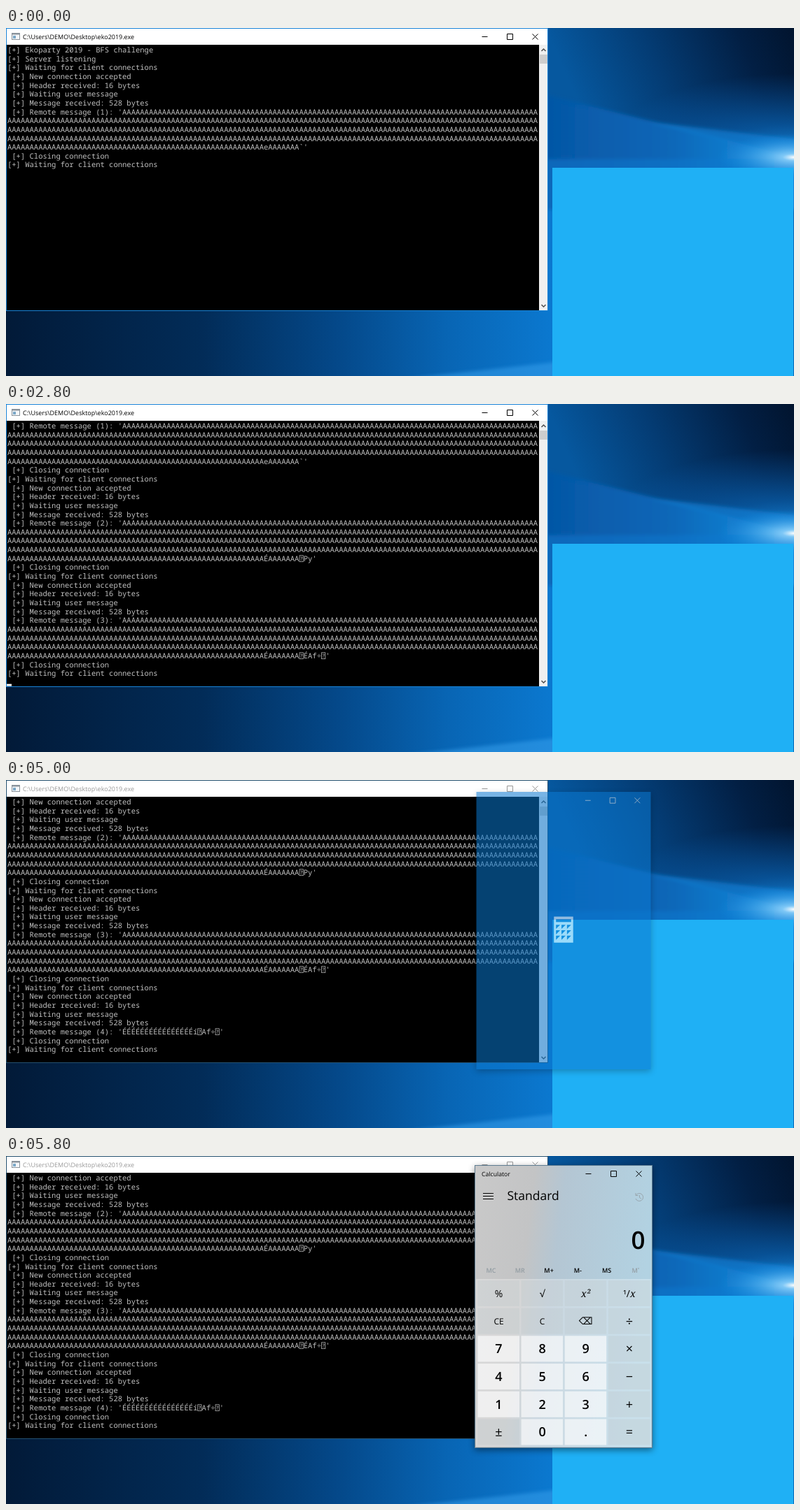
An HTML page for the animation above (6.7 s loop, 1125x498 px).

```html
<!DOCTYPE html>
<html lang="en">
<head>
<meta charset="utf-8">
<title>Console and calculator</title>
<style>
html, body { margin: 0; width: 100%; height: 100%; overflow: hidden; background: #011029; }
svg { display: block; }
text { font-family: "Open Sans", "Noto Sans", "DejaVu Sans", sans-serif; text-rendering: geometricPrecision; white-space: pre; }
#rows text { font: 10.53px "Noto Sans Mono", "DejaVu Sans Mono", monospace; fill: #c0c0c0; }
.line { fill: none; stroke: currentColor; }
.mid text { text-anchor: middle; }
#calc { transform-origin: 796px 215.5px; }
#frame { filter: drop-shadow(0 3px 5px rgba(0, 0, 0, .45)); }
</style>
</head>
<body>
<svg width="1125" height="498" viewBox="0 0 1125 498">
  <defs>
    <linearGradient id="floor">
      <stop offset="0" stop-color="#021a38"/><stop offset=".25" stop-color="#022c58"/>
      <stop offset=".42" stop-color="#044889"/><stop offset=".56" stop-color="#0865b4"/>
      <stop offset=".69" stop-color="#0b78cf"/><stop offset="1" stop-color="#0a68b8"/>
    </linearGradient>
    <linearGradient id="sky" x2="1" y2="-.3">
      <stop offset="0" stop-color="#06589f"/><stop offset=".35" stop-color="#043c74"/>
      <stop offset=".7" stop-color="#021f44"/><stop offset="1" stop-color="#011026"/>
    </linearGradient>
    <linearGradient id="ray">
      <stop offset="0" stop-color="#0656a4"/><stop offset=".5" stop-color="#0867b8"/>
      <stop offset="1" stop-color="#1e92e4"/>
    </linearGradient>
    <radialGradient id="haze">
      <stop offset="0" stop-color="#1a90e6"/><stop offset=".4" stop-color="#0a64b4" stop-opacity=".7"/>
      <stop offset="1" stop-color="#0a5cac" stop-opacity="0"/>
    </radialGradient>
    <radialGradient id="glow">
      <stop offset="0" stop-color="#fff"/><stop offset=".15" stop-color="#9fdcff" stop-opacity=".75"/>
      <stop offset="1" stop-color="#0a90e8" stop-opacity="0"/>
    </radialGradient>
    <linearGradient id="acrylic" y2=".2">
      <stop offset="0" stop-color="#c9c9c9"/><stop offset=".33" stop-color="#c3c4c5"/>
      <stop offset=".5" stop-color="#b4c6d3"/><stop offset="1" stop-color="#b2d2e2"/>
    </linearGradient>
    <filter id="soft" x="-20%" y="-20%" width="140%" height="140%"><feGaussianBlur stdDeviation="2.500"/></filter>
  </defs>

  <rect width="1125" height="498" fill="url(#floor)"/>
  <path d="M560 503L785 478V503Z" fill="#3aa2ee" opacity=".5" filter="url(#soft)"/>
  <rect x="770" width="355" height="240" fill="url(#sky)"/>
  <ellipse cx="1125" cy="185" rx="280" ry="120" fill="url(#haze)"/>
  <g filter="url(#soft)">
    <path d="M765 94L1135 187V260H765Z" fill="url(#ray)"/>
    <path d="M765 188L1135 187V260H765Z" fill="#0a78d0" opacity=".5"/>
    <path d="M915 134L1135 187L1135 160Z" fill="#1484da" opacity=".6"/>
  </g>
  <ellipse cx="1125" cy="185" rx="110" ry="34" fill="url(#glow)"/>
  <rect x="780" y="200" width="344" height="344" fill="#1fb0f5"/>

  <g id="console">
    <rect width="774" height="404.5" fill="#000"/>
    <rect width="774" height="24" fill="#fff"/>
    <rect x="761" y="24" width="13" height="380" fill="#f0f0f0"/>
    <rect x="762" y="38" width="11" height="13" fill="#cdcdcd"/>
    <path class="line" d="M764.5 33l3-3 3 3M764.5 396l3 3 3-3" color="#505050" stroke-width="1.5"/>
    <rect id="edge" class="line" x=".5" y=".5" width="773" height="404"/>
    <path d="M8 7h12v10h-12z" fill="#8a939b"/>
    <path d="M9 9.500h10v6.500h-10z" fill="#f4f6f8"/>
    <path d="M10 11h4v4h-4z" fill="#7aa7c7"/>
    <g id="caption">
      <text x="24" y="15.500" font-size="9" fill="currentColor">C:\Users\DEMO\Desktop\eko2019.exe</text>
      <path class="line ctl" data-x="683.5" data-y="12.5"/>
    </g>
    <g id="rows"></g>
    <rect id="cursor" x="1" width="7" height="3" fill="#fff"/>
  </g>

  <g id="calc">
    <rect id="frame" x="669" y="13" width="254" height="405"/>
    <path class="line ctl" data-x="831.5" data-y="25.5"/>
    <g id="splash">
      <path d="M782 195h28v38h-28z" fill="#fff"/>
      <path id="keys" d="M785 199h22v4h-22z" fill="#0a78d0"/>
    </g>
    <g id="face">
      <rect class="line" x="669.5" y="13.5" width="253" height="404" color="#5f7d92"/>
      <text x="679" y="29" font-size="8.7">Calculator</text>
      <path class="line" d="M681 53.500h15M681 57.500h15M681 61.500h15"/>
      <text x="715.5" y="63" font-size="17.5">Standard</text>
      <path class="line" d="M899.500 56a5.500 5.500 0 1 1-.5 5M899 53v3.500h3.500M904.500 56v3.500l2.500 1.500" color="#98a5ad"/>
      <text x="902.5" y="133" font-size="35" font-weight="600" text-anchor="middle">0</text>
      <g id="memory" class="mid" font-size="9" font-weight="600"></g>
    </g>
    <g id="pad">
      <rect x="671" y="176" width="250" height="240" fill="#fff" opacity=".3"/>
      <g id="tiles"></g>
      <g id="labels" class="mid"></g>
    </g>
  </g>
</svg>
<script>
const $ = id => document.getElementById(id);
const show = (id, on) => $(id).style.display = on ? '' : 'none';
const label = (x, y, s, attrs = '') => `<text x="${x}" y="${y}" ${attrs}>${s}</text>`;

// Minimise, maximise and close signs
for (const p of document.querySelectorAll('.ctl')) {
  const x = +p.dataset.x, y = +p.dataset.y;
  p.setAttribute('d', `M${x - 4} ${y}h8M${x + 32} ${y - 4}h8v8h-8zM${x + 68} ${y - 4}l8 8m0-8l-8 8`);
}

// Console log, wrapped at 120 columns
const COLS = 120, VIEW = 30, ROW = 12.65;
const waiting = '[+] Waiting for client connections';
const log = ['[+] Ekoparty 2019 - BFS challenge', '[+] Server listening', waiting];
const A = n => 'A'.repeat(n);
const messages = [
  A(512) + 'e' + A(7) + '`',
  A(512) + 'É' + A(7) + '⍰Py',
  A(512) + 'É' + A(7) + '⍰ÉAf÷⍰',
  'É'.repeat(16) + 'í⍰Af÷⍰'
];
const ends = messages.map((m, i) => {
  const line = ` [+] Remote message (${i + 1}): '${m}'`;
  log.push(' [+] New connection accepted', ' [+] Header received: 16 bytes',
    ' [+] Waiting user message', ' [+] Message received: 528 bytes');
  for (let c = 0; c < line.length; c += COLS) log.push(line.slice(c, c + COLS));
  return log.push(' [+] Closing connection', waiting);
});
$('rows').innerHTML = Array.from({ length: VIEW }, (_, i) => label(2, 35 + i * ROW, '')).join('');
const rows = [...$('rows').children];

// Calculator parts
let keys = $('keys').getAttribute('d');
for (let i = 0; i < 9; i++) keys += `M${785 + i % 3 * 8} ${207 + (i / 3 | 0) * 8}h6l-6 6z`;
$('keys').setAttribute('d', keys);
$('memory').innerHTML = ['MC', 'MR', 'M+', 'M-', 'MS', 'M˅'].map((s, i) =>
  label(692.5 + i * 41.3, 167, s, i < 2 || i > 4 ? 'fill="#939da3"' : '')).join('');
const serif = s => `<tspan font-family="Noto Serif, serif" font-style="italic">${s}</tspan>`;
const names = ['%', '√', serif('x²'), '¹/' + serif('x'), 'CE', 'C', '⌫', '÷',
  7, 8, 9, '×', 4, 5, 6, '−', 1, 2, 3, '+', '±', 0, '.', '='];
names.forEach((s, i) => {
  const x = 673.5 + i % 4 * 62.1, y = 178 + (i / 4 | 0) * 39.7;
  const digit = typeof s === 'number' || s === '.';
  const size = i > 6 ? 18 : i === 4 || i === 5 ? 12 : 14;
  $('tiles').innerHTML += `<rect x="${x}" y="${y}" width="59.5" height="37" ` +
    (digit ? 'fill="#fff" opacity=".62"/>' : 'fill="#b9c3c6" opacity=".3"/>');
  $('labels').innerHTML += label(x + 30, y + 18.5 + size * .36, s,
    `font-size="${size}" font-weight="${digit ? 600 : 400}"`);
});

// Times at which the cursor flips, starting hidden
const blinks = [100, 600, 1700, 2200, 2700, 3900, 4300, 4800];
const fade = [.15, .55, .85, .97, 1];
let last = -1;

function draw(t) {
  const count = ends[[900, 2800, 4800].filter(s => t >= s).length];
  const top = Math.max(0, count + 1 - VIEW);
  rows.forEach((r, i) => r.textContent = top + i < count ? log[top + i] : '');
  $('cursor').setAttribute('y', 33.8 + (count - top) * ROW);
  show('cursor', blinks.filter(b => t >= b).length % 2);

  const opened = t >= 4900, loaded = t >= 5400;
  $('caption').style.color = opened ? '#999' : '#000';
  $('edge').style.color = opened ? '#24506f' : '#1883d7';
  show('calc', opened);
  if (!opened) return;
  const age = t - 4900;
  $('calc').style.opacity = fade[Math.min(age / 100, 4)];
  $('calc').style.transform = `scale(${1 - .06 * Math.exp(-age / 90)})`;
  $('calc').style.color = loaded ? '#000' : '#fff';
  $('frame').setAttribute('fill', loaded ? 'url(#acrylic)' : '#0a78d0');
  show('splash', !loaded);
  show('face', loaded);
  show('pad', t >= 5500);
  $('labels').style.opacity = t >= 5800 ? 1 : .5;
}

const start = performance.now();
function tick() {
  const t = Math.floor((performance.now() - start) % 6700 / 100) * 100;
  if (t !== last) draw(last = t);
  requestAnimationFrame(tick);
}
tick();
</script>
</body>
</html>
```
